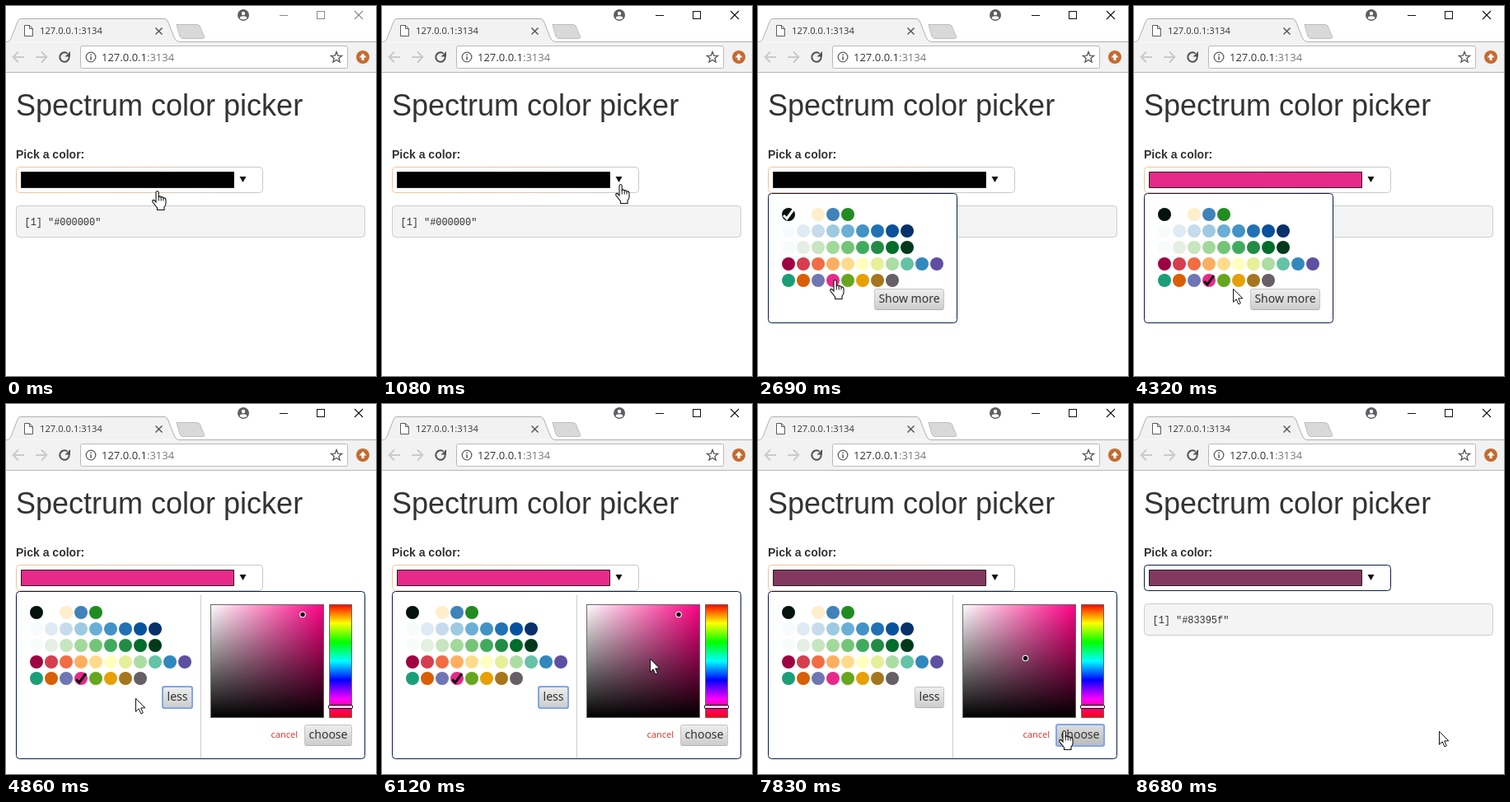
An HTML page with a canvas that plays this animation: 449x449 px, repeating every 9140 ms.

```html
<!DOCTYPE html>
<html lang="en">
<head>
<meta charset="utf-8">
<title>Spectrum color picker</title>
<style>
html, body { margin: 0; width: 100%; height: 100%; overflow: hidden; background: #fff; }
canvas { display: block; width: 449px; height: 449px; }
</style>
</head>
<body>
<canvas id="stage" width="449" height="449"></canvas>
<script>
const ctx = document.getElementById('stage').getContext('2d');
const LOOP = 9140;
const UI = '"Open Sans", sans-serif';
const BUTTON = '"Noto Sans", sans-serif';
const PAGE = '"Liberation Sans", Arial, sans-serif';
const CODE = '"Liberation Mono", monospace';
const NAVY = '#0b1d45';
const PINK = '#e7298a';
const PLUM = '#83395f';

const palette = [
  '#04120f #ffffff #ffeecb #4083b8 #228b22',
  '#f7fbfb #deebf4 #c6dbec #9ecae1 #6baed6 #4292c6 #2171b5 #08519c #08306b',
  '#f7fbf9 #e5efe3 #c7e5c0 #a1d99b #74c476 #41ab5d #238b45 #006d2c #003a1b',
  '#9e0142 #d53e4f #f06d43 #fdae61 #fedc8b #ffffbf #e6f098 #abdda4 #66c2a5 #3288bd #5e4fa2',
  '#1b9e77 #d95f02 #7075b3 #e7298a #66a61e #e6a002 #a6761d #666066'
].map(row => row.split(' '));

const smooth = p => p * p * (3 - 2 * p);
const easeOut = p => 1 - Math.pow(1 - p, 2.5);

// Pointer moves: first and last step time, step count, destination, easing
const moves = [
  { start: 70, end: 680, steps: 9, to: [289, 216], ease: smooth },
  { start: 1620, end: 2460, steps: 12, to: [95, 331], ease: smooth },
  { start: 2540, end: 2540, steps: 1, to: [94, 331], ease: smooth },
  { start: 2690, end: 2690, steps: 1, to: [93, 332], ease: smooth },
  { start: 4320, end: 4630, steps: 5, to: [157, 357], ease: easeOut },
  { start: 5400, end: 6120, steps: 10, to: [325, 309], ease: smooth },
  { start: 7120, end: 7670, steps: 8, to: [371, 396], ease: smooth },
  { start: 7900, end: 7900, steps: 1, to: [370, 396], ease: smooth },
  { start: 8680, end: 8680, steps: 1, to: [370, 397], ease: smooth }
];

function pointerAt(t) {
  let pos = [183, 224];
  for (const m of moves) {
    if (t < m.start) break;
    const gap = m.steps > 1 ? (m.end - m.start) / (m.steps - 1) : 1;
    const step = Math.min(m.steps, Math.floor((t - m.start) / gap + 1e-6) + 1);
    const k = m.ease(step / m.steps);
    pos = pos.map((v, i) => Math.round(v + (m.to[i] - v) * k));
  }
  return pos;
}

function isHand(t, x, y) {
  if (t < 1620) return true;
  if (t < 2540) return y < 227 || y > 303;
  if (t < 4320) return true;
  if (t < 4860) return x > 141 && y > 343;
  if (t < 6120) return x > 190 && x < 226 && y > 343;
  return t > 7120 && t < 7900 && x > 362 && y > 388;
}

function text(str, x, y, font, color) {
  ctx.font = font;
  ctx.fillStyle = color;
  ctx.fillText(str, x, y);
}

function line(points, color, width = 1, closed = false) {
  ctx.beginPath();
  points.forEach(([x, y]) => ctx.lineTo(x, y));
  if (closed) ctx.closePath();
  ctx.strokeStyle = color;
  ctx.lineWidth = width;
  ctx.stroke();
}

function polygon(points, fill, stroke) {
  ctx.beginPath();
  points.forEach(([x, y]) => ctx.lineTo(x, y));
  ctx.closePath();
  ctx.fillStyle = fill;
  ctx.fill();
  if (stroke) {
    ctx.strokeStyle = stroke;
    ctx.lineWidth = 1;
    ctx.stroke();
  }
}

function disc(x, y, r, color) {
  ctx.beginPath();
  ctx.arc(x, y, r, 0, 2 * Math.PI);
  ctx.fillStyle = color;
  ctx.fill();
}

function box(x, y, w, h, r, fill, stroke) {
  ctx.beginPath();
  ctx.roundRect(x + .5, y + .5, w - 1, h - 1, r);
  ctx.fillStyle = fill;
  ctx.fill();
  ctx.strokeStyle = stroke;
  ctx.lineWidth = 1;
  ctx.stroke();
}

function gradient(x0, y0, x1, y1, colors) {
  const g = ctx.createLinearGradient(x0, y0, x1, y1);
  colors.forEach((c, i) => g.addColorStop(i / (colors.length - 1), c));
  return g;
}

function cross(x, y, r, color, width) {
  line([[x - r, y - r], [x + r, y + r]], color, width);
  line([[x + r, y - r], [x - r, y + r]], color, width);
}

function drawTitleBar(focused) {
  const ink = focused ? '#111' : '#8a8a8a';
  disc(288, 11, 7, '#5e5f64');
  disc(288, 9, 2.2, '#fff');
  ctx.beginPath();
  ctx.ellipse(288, 14.3, 4.2, 2.1, 0, 0, 2 * Math.PI);
  ctx.fill();
  line([[332, 11.5], [342, 11.5]], ink);
  ctx.strokeRect(377.5, 6.5, 9, 9);
  cross(428, 11, 5, ink, 1.1);
}

function drawTab() {
  ctx.fillStyle = '#f2f2f2';
  ctx.fillRect(0, 44, 449, 36);
  ctx.beginPath();
  ctx.moveTo(0, 43.5);
  ctx.bezierCurveTo(5, 43.5, 5, 41, 7, 37);
  ctx.lineTo(14, 19);
  ctx.quadraticCurveTo(15, 15.5, 18, 15.5);
  ctx.lineTo(192, 15.5);
  ctx.quadraticCurveTo(195, 15.5, 196.5, 19);
  ctx.lineTo(204, 38);
  ctx.quadraticCurveTo(206, 43.5, 210, 43.5);
  ctx.fillStyle = '#f2f2f2';
  ctx.fill();
  ctx.lineTo(449, 43.5);
  ctx.strokeStyle = '#b0b0b0';
  ctx.lineWidth = 1;
  ctx.stroke();
  polygon([[207, 22.5], [232, 22.5], [235, 24], [241, 38], [239, 39.5], [214, 39.5], [211, 37]], '#d9d9d9', '#bdbdbd');
  polygon([[22.5, 23.5], [28.5, 23.5], [32.5, 27.5], [32.5, 36.5], [22.5, 36.5]], '#fff', '#5b5b5b');
  line([[28.5, 23.5], [28.5, 27.5], [32.5, 27.5]], '#5b5b5b');
  text('127.0.0.1:3134', 41, 34, '11.2px ' + UI, '#333');
  cross(185.5, 30.5, 4, '#555', 1.5);
}

function drawToolbar() {
  for (const [tip, dir] of [[8, 1], [50, -1]]) {
    line([[tip + dir, 62], [tip + dir * 14, 62]], '#cacaca', 2);
    line([[tip + dir * 7, 55.5], [tip + dir * .7, 62], [tip + dir * 7, 68.5]], '#cacaca', 2);
  }
  ctx.beginPath();
  ctx.arc(71, 62, 5.7, -.5, -.9 + 0, false);
  ctx.strokeStyle = '#555';
  ctx.lineWidth = 2;
  ctx.stroke();
  polygon([[78, 55], [78, 61.5], [71.5, 61.5]], '#555');

  box(90, 48, 325, 28, 2, '#fff', '#b9b9b9');
  ctx.beginPath();
  ctx.arc(103, 62, 5.8, 0, 2 * Math.PI);
  ctx.strokeStyle = '#606060';
  ctx.lineWidth = 1.3;
  ctx.stroke();
  ctx.fillStyle = '#606060';
  ctx.fillRect(102.2, 58.5, 1.6, 1.6);
  ctx.fillRect(102.2, 61.2, 1.6, 4.3);
  text('127.0.0.1', 116, 67, '13px ' + UI, '#333');
  text(':3134', 116 + ctx.measureText('127.0.0.1').width, 67, '13px ' + UI, '#777');

  const star = Array.from({ length: 10 }, (_, i) => {
    const a = -Math.PI / 2 + i * Math.PI / 5, r = i % 2 ? 3 : 7;
    return [401 + r * Math.cos(a), 62.5 + r * Math.sin(a)];
  });
  line(star, '#555', 1.3, true);
  disc(433, 62, 8, '#c76a2f');
  polygon([[433, 57.5], [437.5, 62.5], [434.5, 62.5], [434.5, 66], [431.5, 66], [431.5, 62.5], [428.5, 62.5]], '#fff');
  line([[0, 80.5], [449, 80.5]], '#b6b6b6');
}

function drawPage(color, code, done) {
  text('Spectrum color picker', 12, 133, '36px ' + PAGE, '#333');
  text('Pick a color:', 12, 185, 'bold 14px ' + PAGE, '#333');
  const edge = done ? NAVY : gradient(90, 260, 250, 180, ['#f0c49b', '#c9c9c9']);
  box(12, 195, 300, 32, 4, '#fff', edge);
  box(18, 201, 259, 20, 0, color, '#222');
  polygon([[283.5, 207], [291.5, 207], [287.5, 214]], '#111');
  box(12, 242, 424, 39, 4, '#f4f4f4', '#ccc');
  text(`[1] "${code}"`, 22.5, 266, '11.9px ' + CODE, '#333');
}

function drawButton(label, x, y, w, { hover, focus } = {}) {
  const fill = gradient(0, y, 0, y + 26, hover ? ['#ddd', '#bbb'] : ['#eee', '#ccc']);
  box(x, y, w, 26, 2, fill, focus ? '#7a9fe0' : '#c4c4c4');
  if (focus) {
    ctx.beginPath();
    ctx.roundRect(x, y, w, 26, 2);
    ctx.strokeStyle = '#82a7e6';
    ctx.lineWidth = 2;
    ctx.stroke();
  } else {
    line([[x + 2, y + 25.5], [x + w - 2, y + 25.5]], '#b2b2b2');
  }
  ctx.textAlign = 'center';
  text(label, x + w / 2, y + 17, '14px ' + BUTTON, '#333');
  ctx.textAlign = 'left';
}

function drawCheck(x, y, color) {
  line([[x - 6, y + 1], [x - 2, y + 5], [x + 6, y - 6]], color, 3);
}

function drawPalette(t) {
  palette.forEach((row, j) => row.forEach((c, i) => disc(37 + 18 * i, 253 + 20 * j, 8, c)));
  if (t < 2920) drawCheck(37, 253, '#fff');
  else if (t < 6350) drawCheck(91, 333, '#111');
}

function drawField(t) {
  line([[236.5, 232], [236.5, 430]], '#ccc');
  ctx.fillStyle = gradient(248, 0, 386, 0, ['#fff', 'hsl(329,100%,50%)']);
  ctx.fillRect(248, 243, 138, 138);
  ctx.fillStyle = gradient(0, 243, 0, 381, ['rgba(0,0,0,0)', '#000']);
  ctx.fillRect(248, 243, 138, 138);
  ctx.strokeStyle = '#666';
  ctx.lineWidth = 1;
  ctx.strokeRect(248.5, 243.5, 137, 137);

  const hues = ['#f00', '#ff0', '#0f0', '#0ff', '#00f', '#f0f', '#f00'];
  box(392, 243, 28, 138, 0, gradient(0, 243, 0, 381, hues), '#666');
  box(391, 365, 30, 5, 1, '#fbd3e6', '#000');

  const [x, y] = t < 6350 ? [360, 255.5] : [324.5, 308.5];
  disc(x, y, 3.8, '#fff');
  disc(x, y, 2.7, '#000');
  text('cancel', 321.5, 405, '11px ' + BUTTON, '#d93f3f');
}

function drawPopup(t, [px, py]) {
  const wide = t >= 4860;
  box(12, 227, wide ? 424 : 230, wide ? 204 : 158, 4, '#fff', NAVY);
  drawPalette(t);
  if (!wide) {
    const hover = t >= 4320 && px > 141 && py > 343;
    drawButton('Show more', 141, 343, 85, { hover, focus: t >= 4780 });
    return;
  }
  drawField(t);
  drawButton('less', 190, 343, 36, { focus: t < 7830 });
  drawButton('choose', 362, 389, 58, { hover: py > 389 && px > 362, focus: t >= 7830 });
}

function drawArrow(x, y) {
  const shape = [[0, 0], [0, 16], [3.7, 12.5], [6.3, 18.5], [8.8, 17.4], [6.2, 11.6], [11.3, 11.5]];
  polygon(shape.map(([dx, dy]) => [x + .5 + dx, y + .3 + dy]), '#fff', '#111');
}

function drawHand(x, y) {
  ctx.save();
  ctx.translate(x - 6, y);
  ctx.beginPath();
  ctx.moveTo(5, 14);
  ctx.lineTo(5, 2);
  ctx.quadraticCurveTo(6.6, -1, 8.2, 2);
  ctx.lineTo(8.2, 7.5);
  ctx.quadraticCurveTo(10, 6, 11.2, 8);
  ctx.quadraticCurveTo(13, 7, 14, 9);
  ctx.quadraticCurveTo(16.8, 8.3, 17, 11.5);
  ctx.lineTo(17, 16);
  ctx.quadraticCurveTo(16.6, 18.5, 15, 20);
  ctx.lineTo(15, 23.5);
  ctx.lineTo(6.5, 23.5);
  ctx.lineTo(6.5, 21);
  ctx.lineTo(1, 14);
  ctx.quadraticCurveTo(0, 11.5, 2.4, 11.4);
  ctx.closePath();
  ctx.fillStyle = '#fff';
  ctx.fill();
  ctx.strokeStyle = '#111';
  ctx.lineWidth = 1.1;
  ctx.stroke();
  for (const [fx, fy] of [[8.2, 7.5], [11.2, 8], [14, 9]]) {
    line([[fx, fy], [fx, 12.5]], '#111');
  }
  ctx.restore();
}

function draw(t) {
  ctx.fillStyle = '#fff';
  ctx.fillRect(0, 0, 449, 449);
  const pos = pointerAt(t);
  const done = t >= 7900;
  const color = t < 2920 ? '#000' : t < 6350 ? PINK : PLUM;
  drawTitleBar(t >= 1080);
  drawTab();
  drawToolbar();
  drawPage(color, done ? PLUM : '#000000', done);
  if (t >= 1160 && !done) drawPopup(t, pos);
  (isHand(t, ...pos) ? drawHand : drawArrow)(...pos);
}

const began = performance.now();
function tick() {
  draw((performance.now() - began) % LOOP);
  requestAnimationFrame(tick);
}
tick();
</script>
</body>
</html>
```
